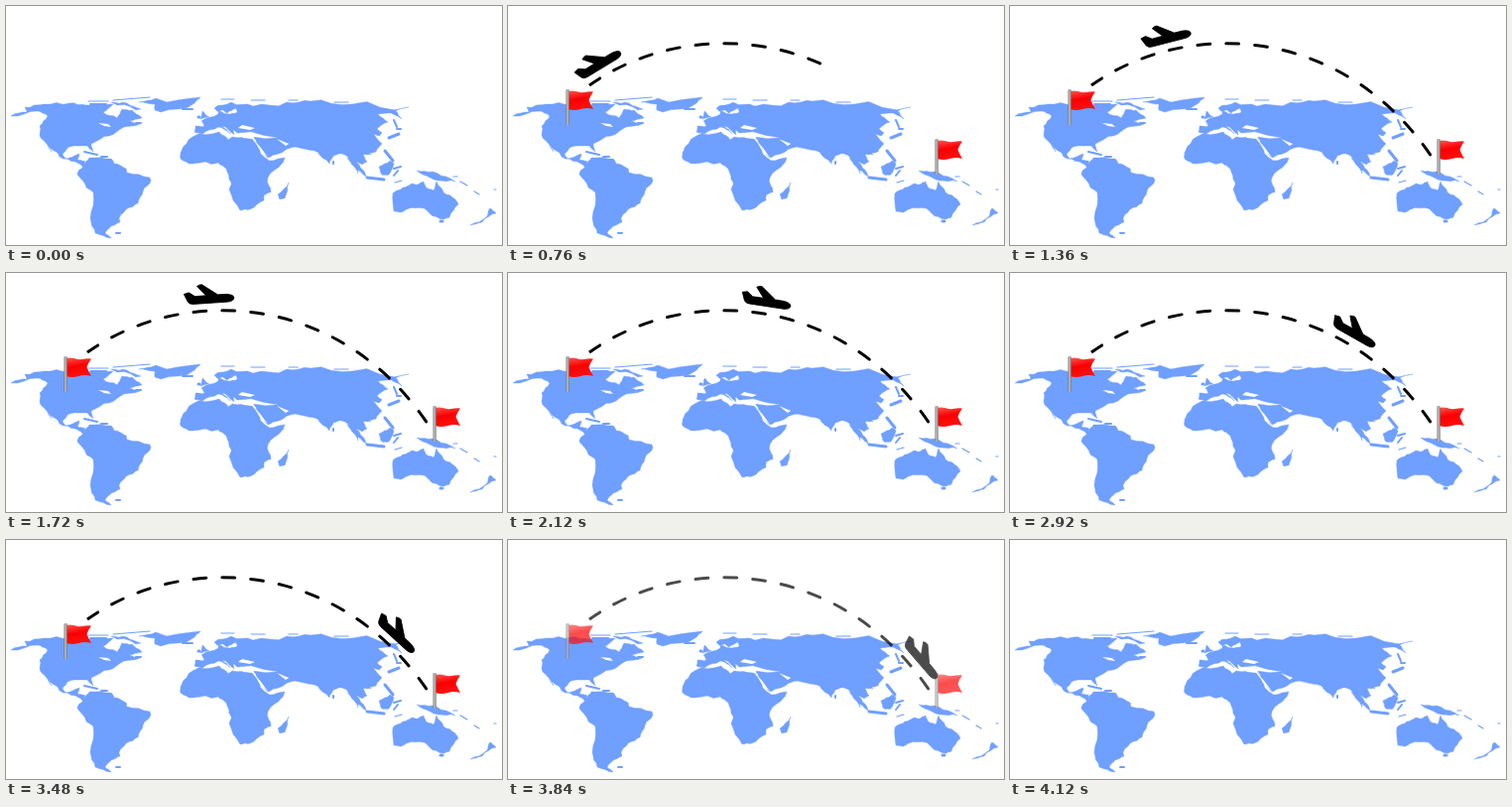
These frames come from a looping animation (500x241 px, 4.16 s). An HTML page:

```html
<!DOCTYPE html>
<html lang="en">
<head>
<meta charset="utf-8">
<title>Flight across the world</title>
<style>
  html, body { margin: 0; width: 100%; height: 100%; overflow: hidden; background: #fff; }
  svg { display: block; width: 100%; height: 100%; }
  #land { fill: #6f9fff; stroke: #6f9fff; stroke-width: 0.4; stroke-linejoin: round; }
  #land .isles { fill: none; stroke-linecap: round; }
</style>
</head>
<body>
<svg viewBox="0 0 500 241">
  <defs>
    <linearGradient id="cloth" x1="0" y1="0" x2="0.25" y2="1">
      <stop offset="0" stop-color="#ff5a50"/>
      <stop offset="0.3" stop-color="#ff2020"/>
      <stop offset="0.5" stop-color="#f90000"/>
      <stop offset="1" stop-color="#ff1010"/>
    </linearGradient>
    <linearGradient id="metal">
      <stop offset="0" stop-color="#777"/>
      <stop offset="0.45" stop-color="#c4c4c4"/>
      <stop offset="1" stop-color="#777"/>
    </linearGradient>
    <g id="flag">
      <path fill="url(#cloth)" d="M2 2C8 0 13 4 18 3Q23 2 27.5 2.5Q24 7 23 11Q25 16 27.5 20Q21 18 15 20Q8 22 2 20Z"/>
      <rect width="3.2" height="36" rx="1" fill="url(#metal)"/>
    </g>
    <mask id="reveal" maskUnits="userSpaceOnUse" x="0" y="0" width="500" height="241">
      <path id="revealLine" fill="none" stroke="#fff" stroke-width="12" pathLength="1" stroke-dasharray="1 2"/>
    </mask>
  </defs>
  <rect width="500" height="241" fill="#fff"/>
  <g id="land">
    <!-- North America -->
    <polygon points="5,111 21,107 19,102 38,99 64,98 81,100 108,99 98,107 112,113 117,104 127,105 137,113 124,116 135,119 119,122 104,131 86,139 88,147 82,141 64,142 57,149 60,154 74,149 72,155 79,156 80,163 70,157 54,152 42,140 46,147 35,133 34,121 42,111 31,106"/>
    <!-- South America -->
    <polygon points="79,160 84,153 106,154 109,159 121,164 122,168 145,173 146,176 138,187 133,199 125,203 114,214 115,218 106,222 100,229 106,234 90,229 85,214 88,188 81,183 72,170 74,165"/>
    <!-- Greenland -->
    <polygon points="134,97 151,93 196,92 190,98 156,107 150,105 150,99"/>
    <!-- Africa -->
    <polygon points="176,154 177,146 188,132 215,127 224,135 228,132 248,134 261,153 266,156 281,153 278,159 264,173 267,188 260,191 260,196 246,205 236,206 225,185 227,178 222,164 214,158 188,159"/>
    <!-- Europe and northern Asia -->
    <polygon points="190,127 191,121 200,121 197,116 214,109 214,106 226,109 233,107 232,103 223,108 219,105 213,106 210,103 227,97 249,101 283,97 307,96 349,99 406,102 393,106 399,114 384,108 375,109 385,117 374,124 379,128 376,131 367,127 379,139 373,147 355,150 318,149 285,137 234,128 229,125 230,130 218,121 226,129 214,122 198,129"/>
    <!-- Southern Asia -->
    <polygon points="249,132 259,147 264,153 275,149 291,142 275,134 283,138 314,146 326,159 330,151 341,148 355,169 353,157 359,160 364,157 360,150 368,150 366,143 300,127"/>
    <!-- Australia -->
    <polygon points="390,189 400,183 409,179 415,180 421,177 425,184 431,186 434,177 441,188 453,195 456,200 447,213 441,215 427,209 421,204 404,205 399,208 391,207"/>
    <!-- Larger islands -->
    <polygon points="414,166 430,167 448,174 453,177 435,176 420,170"/>
    <polygon points="376,162 387,156 391,159 386,170 379,170"/>
    <polygon points="344,153 356,160 363,172 351,162"/>
    <polygon points="285,178 281,194 276,195 274,190"/>
    <polygon points="488,204 494,209 480,218 468,221 485,212"/>
    <polygon points="106,97 122,98 136,104 131,105"/>
    <polygon points="196,114 198,106 205,112"/>
    <path class="isles" stroke-width="3" d="M382 146L390 156M364 173L381 175M386 133L396 129M194 112h1M438 217h2"/>
    <path class="isles" stroke-width="2" d="M391 164L398 162M391 171L395 166M391 115L394 122M79 147L92 150M96 152h6M178 104L188 104M394 124h4M111 229h4M85 99h16M330 157v2M131 118h5"/>
    <path class="isles" stroke-width="1.2" d="M83 96h20M108 95L145 92M217 94h13M247 95h14M285 95h9M331 97h14M458 177L465 181M472 187L477 190M492 185h2M392 178L399 176M451 172h4"/>
  </g>
  <g fill="#fff">
    <path d="M234 123L238 120L251 123L246 125ZM236 128L251 130L249 134L239 133Z"/>
    <path d="M250 135L257 143L265 154L255 144ZM273 134L285 139L282 141Z"/>
    <path d="M93 118L103 119L106 122L99 121Z"/>
  </g>
  <g id="scene">
    <g mask="url(#reveal)">
      <path id="route" fill="none" stroke="#000" stroke-width="3" stroke-linecap="round" stroke-dasharray="12.8 16.1"/>
    </g>
    <use href="#flag" x="58.5" y="84"/>
    <use href="#flag" x="430.5" y="134"/>
    <path id="plane" stroke="#000" stroke-width="0.8" stroke-linejoin="round"
      d="M-25 -2.5L-20 -3.8L-14 0.3L-3 0L-11.5 -9.8Q-9 -11.5 -6.5 -11.3L9 -0.3L18 -0.3Q25 0.5 25.2 3.5Q25 7 19 7.5L-16 8Q-20 8 -21.5 5.5Z"/>
  </g>
</svg>
<script>
const LOOP = 4160, STEP = 40;
const $ = id => document.getElementById(id);
const clamp = v => Math.max(0, Math.min(1, v));

let seed = 7;
const random = () => (seed = seed * 16807 % 2147483647) / 2147483647;

// Splits every edge and nudges its middle sideways, for a ragged coast.
function roughen(points, amount) {
  return points.flatMap(([x, y], i) => {
    const [nx, ny] = points[(i + 1) % points.length];
    const shift = (random() - 0.5) * amount;
    return [[x, y], [(x + nx) / 2 - (ny - y) * shift, (y + ny) / 2 + (nx - x) * shift]];
  });
}

for (const shape of document.querySelectorAll("#land polygon")) {
  let points = shape.getAttribute("points").split(" ").map(pair => pair.split(",").map(Number));
  points = roughen(roughen(points, 0.14), 0.3);
  shape.setAttribute("points", points.join(" "));
}

const curveX = [82, 177, 335, 425], curveY = [80, 12.5, 18.5, 152];
const pairs = curveX.map((x, i) => `${x} ${curveY[i]}`);
const curve = `M${pairs[0]}C${pairs.slice(1).join(" ")}`;
$("route").setAttribute("d", curve);
$("revealLine").setAttribute("d", curve);

const bezier = ([a, b, c, d], u) => {
  const v = 1 - u;
  return v * v * v * a + 3 * v * v * u * b + 3 * v * u * u * c + u * u * u * d;
};
const slope = ([a, b, c, d], u) => {
  const v = 1 - u;
  return v * v * (b - a) + 2 * v * u * (c - b) + u * u * (d - c);
};

// Time and horizontal position of the plane along the route.
const stops = [[600, 82], [1120, 133], [1360, 160.5], [1680, 200], [2120, 258],
  [2800, 330.5], [3480, 384.5], [4120, 424]];

function routeX(time) {
  let i = 1;
  while (i < stops.length - 1 && time > stops[i][0]) i++;
  const [t0, x0] = stops[i - 1], [t1, x1] = stops[i];
  return x0 + (x1 - x0) * clamp((time - t0) / (t1 - t0));
}

function parameterAt(x) {
  let low = 0, high = 1;
  for (let i = 0; i < 24; i++) {
    const mid = (low + high) / 2;
    if (bezier(curveX, mid) < x) low = mid; else high = mid;
  }
  return low;
}

function draw(time) {
  const fadeIn = clamp(time / 400), fadeOut = clamp((4120 - time) / 400);
  $("scene").setAttribute("opacity", Math.min(fadeIn, fadeOut));
  $("revealLine").setAttribute("stroke-dashoffset", 1 - clamp((time - 240) / 820));

  const u = parameterAt(routeX(time));
  const angle = Math.atan2(slope(curveY, u), slope(curveX, u)) * 180 / Math.PI;
  $("plane").setAttribute("transform",
    `translate(${bezier(curveX, u)} ${bezier(curveY, u)}) rotate(${angle}) translate(0 -15.5)`);
  $("plane").setAttribute("opacity", clamp((time - 640) / 120));
}

const start = performance.now();
function tick() {
  const elapsed = (performance.now() - start) % LOOP;
  draw(Math.floor(elapsed / STEP) * STEP);
  requestAnimationFrame(tick);
}
tick();
</script>
</body>
</html>
```
